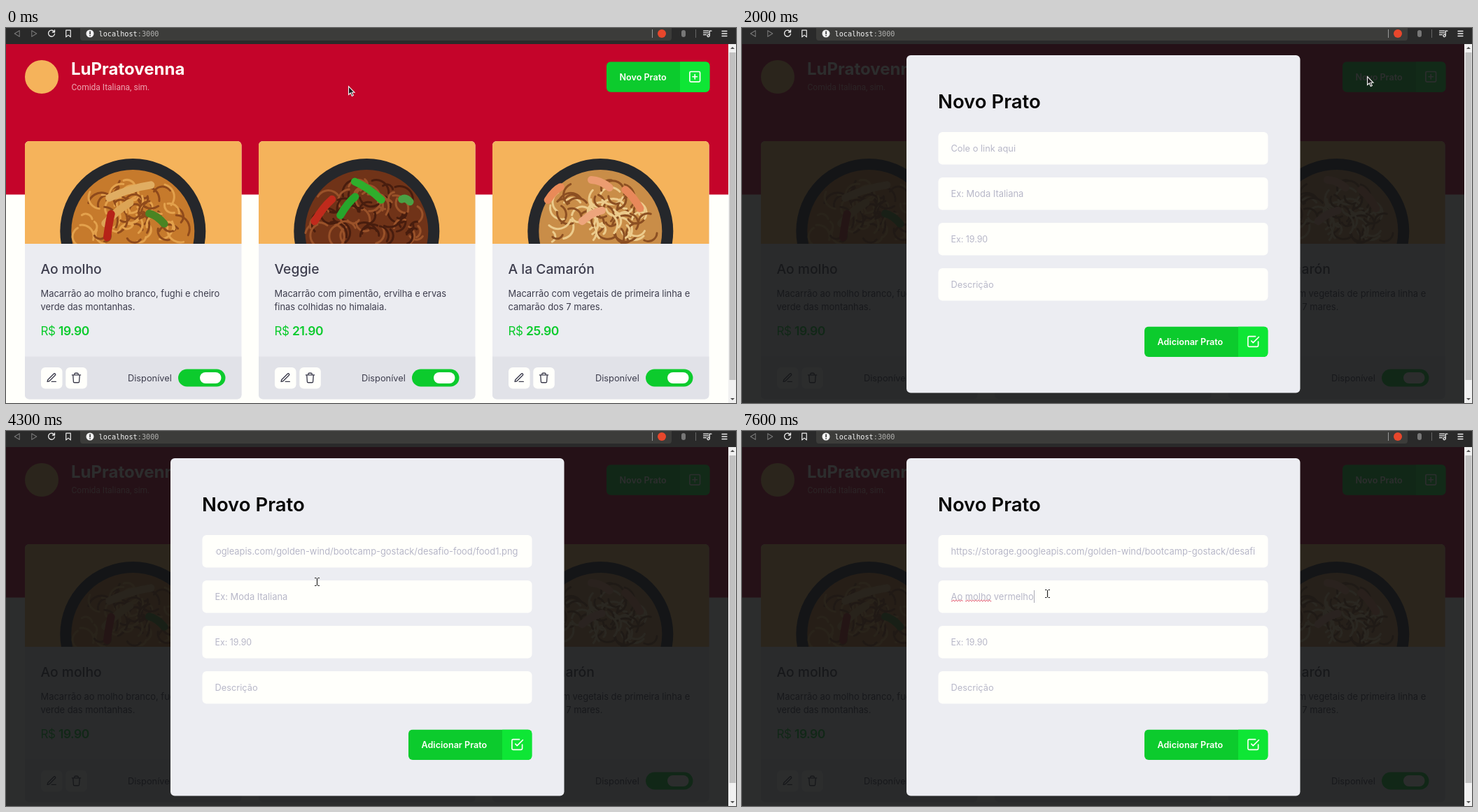
These frames come from a looping animation (1043 px wide and 537 px high, 8000 ms). An HTML page with a canvas:

```html
<!DOCTYPE html>
<html lang="pt">
<head>
<meta charset="utf-8">
<title>Novo Prato</title>
<style>
  html, body { margin: 0; height: 100%; overflow: hidden; }
  canvas { display: block; }
</style>
</head>
<body>
<canvas id="stage" width="1043" height="537"></canvas>
<script>
const ctx = document.getElementById('stage').getContext('2d');
const LOOP = 8000, STEP = 100;
const GREEN = '#0ccb2d', LIME = '#0ee635', WHITE = '#fffffb', HINT = '#b7b7c8', INK = '#3d3d4d';
const URL_TEXT = 'https://storage.googleapis.com/golden-wind/bootcamp-gostack/desafio-food/food1.png';

const ICONS = {
  edit: 'M12 20h9M16.5 3.5a2.12 2.12 0 0 1 3 3L7 19l-4 1 1-4z',
  trash: 'M3 6h18M19 6l-1 14a2 2 0 0 1-2 2H8a2 2 0 0 1-2-2L5 6M8 6V4a2 2 0 0 1 2-2h4a2 2 0 0 1 2 2v2',
  plus: 'M5 3h14a2 2 0 0 1 2 2v14a2 2 0 0 1-2 2H5a2 2 0 0 1-2-2V5a2 2 0 0 1 2-2zM12 8v8M8 12h8',
  check: 'M9 11l3 3L22 4M21 12v7a2 2 0 0 1-2 2H5a2 2 0 0 1-2-2V5a2 2 0 0 1 2-2h11',
  reload: 'M20 7A9 9 0 1 0 21 13M21 2v6h-6',
  bookmark: 'M6 3h12v18l-6-5-6 5z',
  back: 'M18 4v16L5 12z',
  forward: 'M6 4v16l13-8z',
  queue: 'M2 5h13M2 10h13M2 15h7M18 17V5h5M18 17a3 3 0 1 1-3-2.500a3 3 0 0 1 3 2.500',
  menu: 'M4 5h14M4 12h14M4 19h14'
};

// bits: dx, dy, length, angle, colour of the larger pieces on the plate
const DISHES = [
  { name: 'Ao molho', lines: ['Macarrão ao molho branco, fughi e cheiro', 'verde das montanhas.'], price: '19.90',
    tones: ['#c67a2c', '#e3a14c', '#8f4a1b'],
    bits: [[-4, -57, 62, -.3, '#e0ad62'], [-22, -26, 46, -.7, '#dca455'], [-34, -8, 34, -1.4, '#b62318'], [34, -18, 26, .6, '#4a8423']] },
  { name: 'Veggie', lines: ['Macarrão com pimentão, ervilha e ervas', 'finas colhidas no himalaia.'], price: '21.90',
    tones: ['#703318', '#9a5229', '#481d0e'],
    bits: [[2, -58, 46, .6, '#2fae2c'], [-27, -36, 34, -.9, '#27a52b'], [56, -44, 12, .3, '#4aa044'], [-62, -30, 40, -.9, '#c02a1c']] },
  { name: 'A la Camarón', lines: ['Macarrão com vegetais de primeira linha e', 'camarão dos 7 mares.'], price: '25.90',
    tones: ['#c98d48', '#eccb8c', '#8c4f22'],
    bits: [[-66, -54, 26, -.8, '#e98a58'], [0, -68, 28, .4, '#eb9c70'], [46, -46, 34, .9, '#e8885a'], [-12, -22, 32, -.5, '#eda57c']] }
];

const POINTER = [
  [600, 489, 83], [1500, 886, 71], [1600, 893, 69],
  [2300, 893, 69], [3200, 470, 168], [3300, 468, 167],
  [3900, 468, 167], [4500, 436, 233]
];

const TYPED = [
  [5300, 'A'], [5600, 'Ao'], [5800, 'Ao '], [5900, 'Ao m'], [6200, 'Ao mo'], [6300, 'Ao mol'],
  [6500, 'Ao molh'], [6600, 'Ao molho'], [6800, 'Ao molho v'], [6900, 'Ao molho ver'],
  [7100, 'Ao molho verm'], [7300, 'Ao molho verme'], [7500, 'Ao molho vermelh'], [7600, 'Ao molho vermelho']
];

function rect(x, y, w, h, color, radius = 0) {
  ctx.fillStyle = color;
  ctx.beginPath();
  ctx.roundRect(x, y, w, h, radius);
  ctx.fill();
}

function disc(x, y, r, color) {
  ctx.fillStyle = color;
  ctx.beginPath();
  ctx.arc(x, y, r, 0, 7);
  ctx.fill();
}

function text(str, x, y, color, size = 13, weight = 400, family = 'Inter, sans-serif') {
  ctx.font = `${weight} ${size}px ${family}`;
  ctx.fillStyle = color;
  ctx.fillText(str, x, y);
}

function icon(name, cx, cy, size, color, width = 2) {
  ctx.save();
  ctx.translate(cx - size / 2, cy - size / 2);
  ctx.scale(size / 24, size / 24);
  ctx.strokeStyle = color;
  ctx.lineWidth = width;
  ctx.lineCap = ctx.lineJoin = 'round';
  ctx.stroke(new Path2D(ICONS[name]));
  ctx.restore();
}

function clipped(x, y, w, h, radius, paint) {
  ctx.save();
  ctx.beginPath();
  ctx.roundRect(x, y, w, h, radius);
  ctx.clip();
  paint();
  ctx.restore();
}

function random(seed) {
  return () => (seed = seed * 16807 % 2147483647) / 2147483647;
}

function button(label, x, y, w, split, iconName) {
  clipped(x, y, w, 43.5, 6, () => {
    rect(x, y, w, 44, GREEN);
    rect(split, y, w, 44, LIME);
  });
  text(label, x + 18.5, y + 26.5, WHITE, 12.6, 600);
  icon(iconName, (split + x + w) / 2, y + 21.5, 19.6, WHITE);
}

function browserBar() {
  rect(0, 0, 1043, 23, '#2a2a2a');
  rect(106, -6, 845, 24, '#3c3c3a', 4);
  icon('back', 16, 8, 13, '#777');
  icon('forward', 40, 8, 13, '#777');
  icon('reload', 65, 8, 12, '#eee', 2.6);
  icon('bookmark', 89, 8, 13, '#eee', 2.2);
  disc(120, 8, 5.5, '#f2f2f2');
  rect(119.3, 4.5, 1.6, 4.5, '#333');
  rect(119.3, 10, 1.6, 1.6, '#333');
  const mono = 'DejaVu Sans Mono, monospace';
  text('localhost', 132.5, 11.5, '#f5f5f5', 10.2, 400, mono);
  text(':3000', 187.8, 11.5, '#b0b0ae', 10.2, 400, mono);
  rect(923, 2, 1, 12, '#999');
  disc(937, 8, 6, '#e8472c');
  rect(965, 3, 6, 10, '#777', 3);
  rect(985, 2, 1, 12, '#666');
  icon('queue', 1002, 8, 13, '#eee', 2.4);
  icon('menu', 1027, 8, 12, '#eee', 2.6);
}

function scrollbar() {
  rect(1032, 23, 11, 514, '#f1f1f1');
  rect(1033.500, 35, 9, 469, '#c1c1c1');
  for (const [y, d] of [[29, -2], [531, 2]]) {
    ctx.fillStyle = '#505050';
    ctx.beginPath();
    ctx.moveTo(1035, y - d / 2);
    ctx.lineTo(1041, y - d / 2);
    ctx.lineTo(1038, y + d);
    ctx.fill();
  }
}

function plate(cx, cy, dish, seed) {
  const rnd = random(seed);
  disc(cx, cy, 104, '#25272b');
  disc(cx, cy, 88, dish.tones[0]);
  ctx.lineCap = 'round';
  ctx.lineWidth = 3;
  for (let i = 0; i < 70; i++) {
    const a = Math.PI * (1 + rnd()), d = 74 * Math.sqrt(rnd()), start = rnd() * 6;
    ctx.strokeStyle = dish.tones[1 + i % 2];
    ctx.beginPath();
    ctx.arc(cx + d * Math.cos(a), cy + 8 + d * Math.sin(a), 8 + rnd() * 12, start, start + 2);
    ctx.stroke();
  }
  ctx.lineWidth = 11;
  for (const [dx, dy, len, angle, color] of dish.bits) {
    const ux = Math.cos(angle) * len / 2, uy = Math.sin(angle) * len / 2;
    ctx.strokeStyle = color;
    ctx.beginPath();
    ctx.moveTo(cx + dx - ux, cy + dy - uy);
    ctx.quadraticCurveTo(cx + dx, cy + dy - 5, cx + dx + ux, cy + dy + uy);
    ctx.stroke();
  }
}

function card(dish, i) {
  const x = 27 + 334 * i, left = x + 23;
  clipped(x, 162, 309.5, 369.5, 6, () => {
    rect(x, 162, 310, 370, '#ebecf1');
    rect(x, 470.5, 310, 62, '#e1e2e8');
    clipped(x, 162, 310, 147, 0, () => {
      rect(x, 162, 310, 147, '#f5b35b');
      plate(x + 154.3, 291, dish, 91 + i * 57);
    });
  });
  text(dish.name, left - .5, 352, INK, 19.3, 500);
  dish.lines.forEach((line, n) => text(line, left - .5, 385 + 19 * n, INK, 12.9));
  ctx.letterSpacing = '-0.5px';
  text('R$', left - .5, 440, GREEN, 17);
  text(dish.price, left + 25, 440, GREEN, 17.5, 600);
  ctx.letterSpacing = '0px';
  ['edit', 'trash'].forEach((name, n) => {
    rect(left + 35.3 * n, 486, 30.5, 30.5, WHITE, 6);
    icon(name, left + 15.2 + 35.3 * n, 501, 16.3, INK);
  });
  text('Disponível', left + 124, 505.5, INK, 12.8);
  rect(x + 219, 488.5, 67.5, 25, GREEN, 12.5);
  rect(x + 250, 493, 30.5, 16, WHITE, 8);
}

function page() {
  rect(0, 23, 1032, 514, WHITE);
  rect(0, 23, 1032, 215.5, '#c4042a');
  disc(51, 70, 24, '#f5b35b');
  text('LuPratovenna', 93, 67, WHITE, 24, 700);
  text('Comida Italiana, sim.', 93.5, 88.8, '#eda6b2', 12, 400, 'Roboto, sans-serif');
  button('Novo Prato', 858, 48.3, 147.5, 963, 'plus');
  DISHES.forEach(card);
}

function caret(x, y) {
  rect(Math.round(x), y, 1, 18, '#a9a9b4');
}

function squiggle(x, width, y) {
  ctx.strokeStyle = '#e0405a';
  ctx.lineWidth = 1;
  ctx.beginPath();
  for (let d = 0; d <= width; d += .5) ctx.lineTo(x + d, y + Math.sin(d * 1.6));
  ctx.stroke();
}

function linkField(t) {
  const editing = t >= 3500 && t < 4600;
  if (t < 3800) {
    text('Cole o link aqui', 298.5, 177, HINT, 12.8);
    if (editing) caret(299, 163);
    return;
  }
  clipped(299, 160, 434.5, 24, 0, () => {
    ctx.font = '400 12.9px Inter, sans-serif';
    const shift = editing ? ctx.measureText(URL_TEXT).width - 433 : 0;
    text(URL_TEXT, 298.5 - shift, 177, HINT, 12.9);
  });
  if (editing && t < 4300) caret(732, 163);
}

function nameField(t) {
  const value = TYPED.findLast(([at]) => t >= at)?.[1] ?? '';
  text(value || 'Ex: Moda Italiana', 298.5, 242, HINT, 12.9);
  if (value || t >= 4600 && t < 5200) caret(299 + ctx.measureText(value).width, 228);
  // A word is marked once it has been completed by a space.
  for (const word of value.matchAll(/\S+(?= )/g)) {
    const start = ctx.measureText(value.slice(0, word.index)).width;
    squiggle(299 + start, ctx.measureText(word[0]).width, 243);
  }
}

function modal(t) {
  rect(0, 23, 1032, 514, 'rgba(18, 20, 21, .89)');
  rect(235, 39, 562.5, 483.5, '#ecedf2', 6);
  text('Novo Prato', 280, 114.500, '#060606', 27.5, 600);
  for (let i = 0; i < 4; i++) rect(280.5, 149 + 65 * i, 471, 46.5, WHITE, 6);
  linkField(t);
  nameField(t);
  text('Ex: 19.90', 298.5, 307, HINT, 12.4);
  text('Descrição', 298.5, 372, HINT, 12.8);
  button('Adicionar Prato', 575, 427.5, 176.5, 709, 'check');
}

function pointerAt(t) {
  const next = POINTER.findIndex(([at]) => at > t);
  if (next === 0) return POINTER[0].slice(1);
  if (next < 0) return POINTER.at(-1).slice(1);
  const [t0, x0, y0] = POINTER[next - 1], [t1, x1, y1] = POINTER[next];
  const p = (t - t0) / (t1 - t0), e = p * p * (3 - 2 * p);
  return [x0 + (x1 - x0) * e, y0 + (y1 - y0) * e];
}

function pointer(t) {
  const [x, y] = pointerAt(t);
  const overField = t >= 2000 && x > 281 && x < 751 && y > 149 && (y - 149) % 65 < 46;
  ctx.save();
  ctx.translate(Math.round(x), Math.round(y));
  ctx.lineCap = 'butt';
  ctx.lineJoin = 'miter';
  if (overField) {
    const beam = new Path2D('M-3 -5.500H-.5M1.500 -5.500H4M-3 5.500H-.5M1.500 5.500H4M.5 -5V5');
    ctx.strokeStyle = '#222';
    ctx.lineWidth = 1.2;
    ctx.stroke(beam);
  } else {
    const arrow = new Path2D('M.5 .5V12.500L3.300 10L5.300 14.500L7.300 13.600L5.300 9.300H9z');
    ctx.fillStyle = '#1c1c1c';
    ctx.strokeStyle = '#f4f4f4';
    ctx.lineWidth = 1.1;
    ctx.fill(arrow);
    ctx.stroke(arrow);
  }
  ctx.restore();
}

function draw(now) {
  const t = Math.floor(now % LOOP / STEP) * STEP;
  page();
  if (t >= 2000) modal(t);
  browserBar();
  scrollbar();
  pointer(t);
  requestAnimationFrame(draw);
}
requestAnimationFrame(draw);
</script>
</body>
</html>
```
